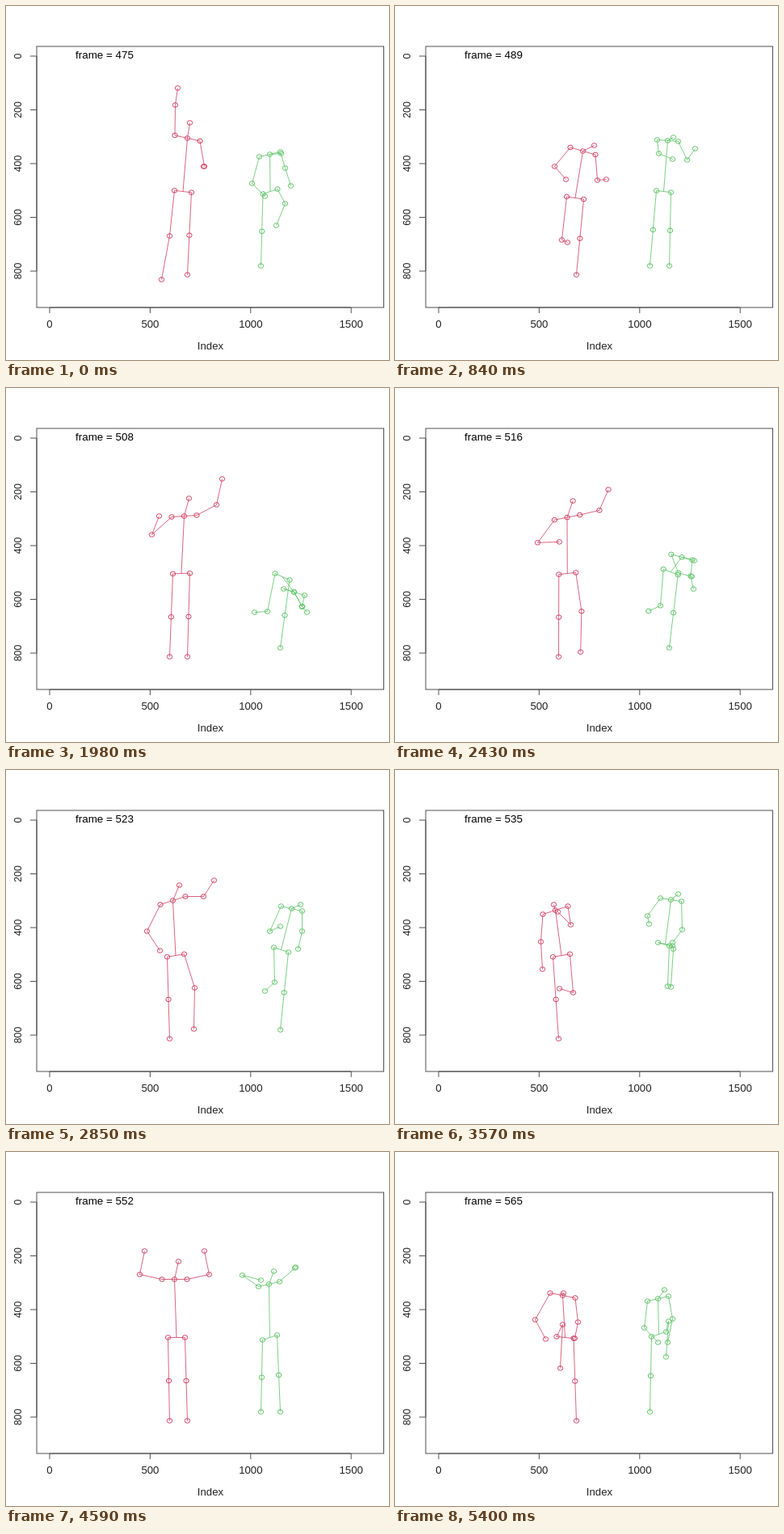
Write an HTML page that moves like this. It is 474 px wide and 438 px high and loops after 5.43 s.

```html
<!DOCTYPE html>
<html lang="en">
<head>
<meta charset="utf-8">
<title>Pose plot</title>
<style>
  html, body { margin: 0; width: 100%; height: 100%; overflow: hidden; background: #fff; }
  svg { display: block; width: 474px; height: 438px; }
  text { font: 13.2px "Liberation Sans", Arial, sans-serif; fill: #222; }
  .tick { text-anchor: middle; }
  .side { font-size: 12.3px; }
  #counter { font-size: 13.4px; fill: #000; }
  path, rect { fill: none; stroke-width: 1; }
  #axes, rect { stroke: #505050; }
  .bones { opacity: .8; }
  .red { stroke: #cf3f62; }
  .green { stroke: #5cc464; }
</style>
</head>
<body>
<svg viewBox="0 0 474 438">
  <rect x="38" y="50" width="429.5" height="323"/>
  <path id="axes"/>
  <g id="labels"></g>
  <text class="tick" x="253" y="425">Index</text>
  <text id="counter" x="86" y="65">frame = 475</text>
  <g id="actors" transform="translate(.5 .5)"></g>
</svg>
<script>
const LOOP = 5430, STEP = 60, FIRST = 475, LAST = 565;
const KEYS = [FIRST, 489, 508, 523, 535, 552, LAST];
const $ = id => document.getElementById(id);

function add(parent, tag, attrs, text = '') {
  const el = document.createElementNS('http://www.w3.org/2000/svg', tag);
  for (const name in attrs) el.setAttribute(name, attrs[name]);
  el.textContent = text;
  return parent.appendChild(el);
}

function drawAxes() {
  let d = 'M54 373H427M38 62V328';
  for (let i = 0; i < 4; i++) {
    const x = 54 + i * 124.4;
    d += `M${x} 373v7`;
    add($('labels'), 'text', { class: 'tick', x, y: 398 }, i * 500);
  }
  for (let i = 0; i < 5; i++) {
    const y = 62 + i * 66.5;
    d += `M38 ${y}h-8`;
    add($('labels'), 'text', { class: 'tick side', transform: `translate(18.5 ${y}) rotate(-90)` }, i * 200);
  }
  $('axes').setAttribute('d', d);
}

const mix = (a, b, k) => a + (b - a) * k;
const mixPoint = (p, q, k) => p.map((v, i) => mix(v, q[i], k));

function makeActor(color, body) {
  return {
    ...body,
    poses: [],
    bones: add($('actors'), 'path', { class: 'bones ' + color }),
    joints: add($('actors'), 'path', { class: color })
  };
}

// Shoulders and hips lean with the tilt, and the pelvis balances between neck and feet.
// A left arm not given mirrors the right one; a leg not given stands on its foot.
function pose(actor, { neck, head, tilt = 0, lift = 0, armR, armL, legR, legL }) {
  const { feet, floor, shoulder, hip, waist, sway } = actor;
  const pelvis = [mix((feet[0] + feet[1]) / 2, neck[0], .5), waist - lift];
  const beside = ([x, y], width, drop) => [x + width, y + drop];
  const mirror = arm => arm.map(([x, y]) => [2 * neck[0] - x, y]);
  const stand = (top, x) => [mixPoint(top, [x, floor], .52), [x, floor]];
  const hipR = beside(pelvis, -hip, -tilt * sway), hipL = beside(pelvis, hip, tilt * sway);
  actor.poses.push([
    [neck, head],
    [neck, beside(neck, -shoulder, -tilt), ...armR],
    [neck, beside(neck, shoulder, tilt), ...(armL || mirror(armR))],
    [hipR, ...(legR || stand(hipR, feet[0]))],
    [hipL, ...(legL || stand(hipL, feet[1]))]
  ]);
}

// The root slides straight; each limb segment swings and changes length.
function mixChain(a, b, k) {
  const out = [mixPoint(a[0], b[0], k)];
  for (let i = 1; i < a.length; i++) {
    const polar = c => {
      const dx = c[i][0] - c[i - 1][0], dy = c[i][1] - c[i - 1][1];
      return { len: Math.hypot(dx, dy), dir: Math.atan2(dy, dx) };
    };
    const p = polar(a), q = polar(b), turn = q.dir - p.dir;
    const dir = p.dir + Math.atan2(Math.sin(turn), Math.cos(turn)) * k;
    const len = mix(p.len, q.len, k), [x, y] = out[i - 1];
    out.push([x + len * Math.cos(dir), y + len * Math.sin(dir)]);
  }
  return out;
}

function drawActor({ poses, bones, joints }, frame) {
  const i = Math.max(1, KEYS.findIndex(key => key >= frame));
  const k = (frame - KEYS[i - 1]) / (KEYS[i] - KEYS[i - 1]);
  const chains = poses[i - 1].map((chain, n) => mixChain(chain, poses[i][n], k));
  const line = pts => 'M' + pts.map(p => p.map(v => v.toFixed(2)).join(' ')).join('L');
  const [[neck], , , [hipR], [hipL]] = chains;
  bones.setAttribute('d', [...chains, [neck, mixPoint(hipR, hipL, .5)], [hipR, hipL]].map(line).join(''));

  const [spine, armR, armL, legR, legL] = chains;
  const dots = [...spine, ...armR.slice(1), ...armL.slice(1), ...legR, ...legL];
  joints.setAttribute('d', dots.map(([x, y]) =>
    `M${(x - 3.2).toFixed(2)} ${y.toFixed(2)}a3.2 2.8 0 1 0 6.4 0a3.2 2.8 0 1 0-6.4 0`).join(''));
}

drawAxes();
const red = makeActor('red', { feet: [202, 224], floor: 332, shoulder: 15.5, hip: 10.5, waist: 229, sway: .35 });
const green = makeActor('green', { feet: [315, 339], floor: 321, shoulder: 13, hip: 9, waist: 229, sway: 1 });

pose(red, { neck: [224, 163], head: [227, 144], tilt: 3.5,
  armR: [[209, 122], [212, 101]], armL: [[245, 198], [244, 198]], legR: [[202, 284], [192, 338]] });
pose(red, { neck: [232, 179], head: [246, 172], tilt: 4.5, lift: -8,
  armR: [[197, 198], [211, 214]], armL: [[250, 215], [261, 214]], legR: [[206, 289], [213, 292]] });
pose(red, { neck: [220, 158], head: [226, 136], tilt: -1,
  armR: [[180, 181], [189, 158]], armL: [[260, 144], [267, 112]] });
pose(red, { neck: [206, 161], head: [214, 142], tilt: -5,
  armR: [[174, 199], [190, 223]], armL: [[244, 156], [257, 136]], legL: [[233, 269], [232, 320]] });
pose(red, { neck: [198, 173], head: [196, 166], tilt: -5,
  armR: [[180, 212], [182, 246]], armL: [[217, 191], [201, 175]], legL: [[220, 275], [203, 270]] });
pose(red, { neck: [208, 157], head: [213, 135],
  armR: [[165, 151], [171, 122]] });
pose(red, { neck: [207, 177], head: [208, 174], tilt: 3,
  armR: [[173, 207], [186, 231]], armL: [[226, 210], [222, 230]], legR: [[207, 213], [204, 267]] });

pose(green, { neck: [326, 183], head: [340, 182], tilt: -3,
  armR: [[304, 219], [320, 235]], armL: [[345, 200], [352, 222]], legL: [[345, 244], [334, 271]] });
pose(green, { neck: [337, 166], head: [344, 162], tilt: 1,
  armR: [[326, 182], [343, 189]], armL: [[361, 190], [371, 176]] });
pose(green, { neck: [356, 252], head: [366, 270], tilt: 4, lift: -4,
  armR: [[356, 252], [366, 270]], armL: [[366, 270], [372, 277]], legR: [[323, 276], [307, 277]] });
pose(green, { neck: [353, 171], head: [364, 166], tilt: 3, lift: 7,
  armR: [[326, 199], [339, 193]], armL: [[366, 199], [361, 221]], legR: [[332, 262], [320, 273]] });
pose(green, { neck: [341, 160], head: [350, 153], tilt: 2, lift: 14,
  armR: [[312, 180], [314, 190]], armL: [[355, 197], [343, 213]],
  legR: [[339, 217], [337, 267]], legL: [[344, 221], [341, 268]] });
pose(green, { neck: [325, 163], head: [331, 147], tilt: -3,
  armR: [[292, 152], [315, 158]], armL: [[357, 143], [358, 142]] });
pose(green, { neck: [325, 181], head: [333, 170], tilt: -3, lift: 4,
  armR: [[308, 217], [325, 235]], armL: [[343, 206], [337, 235]], legL: [[338, 209], [335, 253]] });

let shown;
function tick() {
  const t = performance.now() % LOOP;
  const frame = Math.min(LAST, FIRST + Math.floor((t + STEP / 2) / STEP));
  if (frame !== shown) {
    shown = frame;
    $('counter').textContent = 'frame = ' + frame;
    drawActor(red, frame);
    drawActor(green, frame);
  }
  requestAnimationFrame(tick);
}
tick();
</script>
</body>
</html>
```
